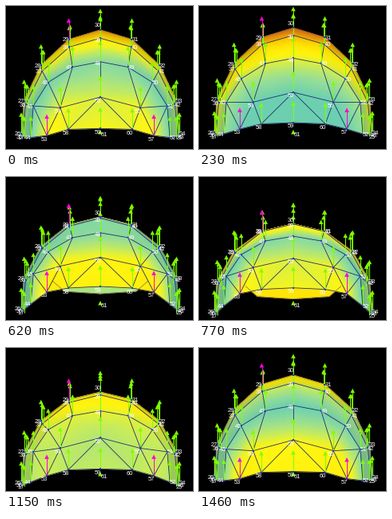
These frames come from a looping animation (234 by 179 pixels, 1540 ms). A matplotlib script:

```python
import numpy as np
import matplotlib.pyplot as plt
from matplotlib.animation import FuncAnimation
from matplotlib.collections import LineCollection, PolyCollection
from matplotlib.colors import LinearSegmentedColormap

W, H, DPI = 234, 179, 64
PX = 72 / DPI                      # one pixel in points
LOOP, TICK, POSES = 1540, 20, 20   # ms, ms, poses per loop
MID, ARROW = 118, 24
GREEN, PINK = "#7dff00", "#ff00d8"
NAVY, BROWN = "#202468", "#75604a"

LIMIT = 18
STOPS = [(0, "#6cd0b0"), (3, "#96de98"), (5.5, "#c8ec5c"), (7.5, "#fff612"),
         (10, "#ffec08"), (12, "#ffcc00"), (14.5, "#f89a10"), (18, "#d85a10")]
HEAT = LinearSegmentedColormap.from_list("heat", [(v / LIMIT, c) for v, c in STOPS])

place, swing, phase = {}, {}, {}


def arch(first, count, width, base, rise, bend, amp, delay):
    """Add an arched row of nodes; amp and delay run from foot to crown."""
    for i, t in enumerate(np.linspace(0, np.pi, count)):
        s, c = abs(np.sin(t)), np.cos(t)
        n = first + i
        place[n] = (MID - width * c * (1 + 0.12 * s * abs(c)), base - rise * s ** bend)
        swing[n] = amp[0] + (amp[1] - amp[0]) * s ** 2
        phase[n] = delay[0] + (delay[1] - delay[0]) * s


arch(17, 9, 95, 169, 117, 1.15, (6, 17), (2.5, 2))       # far row
arch(26, 9, 99, 164, 119.5, 1.15, (6, 18), (2.5, 2))     # skyline
arch(35, 9, 97, 167, 117.5, 1.15, (6, 13), (2.8, 2.5))
arch(44, 9, 87, 163, 91, 0.9, (5, 7), (6, 4))
arch(53, 5, 67, 154, 46, 0.9, (10, 7.5), (8, 8))
arch(58, 3, 40, 147.5, 1.5, 1, (8.5, 9), (8, 8))         # front sill
arch(70, 5, 60, 126, -16, 0.6, (13, 13), (2, 2))         # inner floor

ids = list(place)
index = {n: i for i, n in enumerate(ids)}
rest = np.array([place[n] for n in ids])
swing = np.array([swing[n] for n in ids])
phase = np.array([phase[n] for n in ids])
marked = [n for n in ids if n < 70]


def twin(n):
    """The node on the other side of the middle."""
    return 96 - n if n < 53 else 110 - n if n < 58 else 118 - n


# Faces run from the far side to the near side
floor = [(70, 71, 72, 73, 74)]
bands = [(r + i, r + i + 1, r + i + 10, r + i + 9) for r in (26, 35) for i in range(8)]
left = [(44, 45, 53), (45, 54, 53), (45, 46, 54), (46, 47, 54), (47, 48, 55, 54),
        (54, 55, 58), (53, 54, 58), (55, 59, 58)]
front = left + [tuple(twin(n) for n in face) for face in left]
faces = floor + bands + front

fan = [(f[0], f[k], f[k + 1]) for f in faces for k in range(1, len(f) - 1)]
fan = np.array([[index[n] for n in f] for f in fan])
edges = sorted({tuple(sorted(e)) for f in faces for e in zip(f, f[1:] + f[:1])}
               - {(70, 74)})
outline = [e for e in edges if e[0] >= 70 or e[1] < 35]
wires = [e for e in edges if e not in outline and e != (55, 59)]

side = [abs(f[0] % 9 - 3.5) / 3.5 for f in ((a - 26,) for a, *_ in bands)]
shades = [(0, 0, 0, 0.06 + 0.18 * s if f[0] < 35 else 0.15 * s ** 2)
          for f, s in zip(bands, side)]


def split(n):
    """Barycentric weights and small triangles that split one face n times."""
    spot = {}
    for i in range(n + 1):
        for j in range(n + 1 - i):
            spot[i, j] = len(spot)
    weights = np.array([(n - i - j, i, j) for i, j in spot]) / n
    small = []
    for i, j in spot:
        if i + j < n:
            small.append((spot[i, j], spot[i + 1, j], spot[i, j + 1]))
        if i + j < n - 1:
            small.append((spot[i + 1, j], spot[i + 1, j + 1], spot[i, j + 1]))
    return weights, np.array(small)


weights, small = split(4)
mesh = np.concatenate([small + k * len(weights) for k in range(len(fan))])

fig = plt.figure(figsize=(W / DPI, H / DPI), dpi=DPI, facecolor="black")
ax = fig.add_axes([0, 0, 1, 1])


def lines(segs, color, width, z):
    ax.add_collection(LineCollection(segs, colors=color, linewidths=width * PX, zorder=z),
                      autolim=False)


def polys(shapes, color, z):
    ax.add_collection(PolyCollection(shapes, facecolors=color, linewidths=0, zorder=z),
                      autolim=False)


def arrow_head(x, tip):
    return [(x - 2.8, tip + 3), (x + 2.8, tip + 3), (x, tip - 2.5)]


def number(n, x, y):
    ax.text(x, y, str(n), color="white", family="Liberation Sans",
            fontsize=7.5 * PX, ha="center", va="center", zorder=6)


def label(n, x, y):
    if n >= 53:
        number(n, x - 3, y + 5)
    elif abs(x - MID) < 2:
        number(n, x - 3, y - 5 if n == 30 else y + 3)
    else:
        number(n, x + 4 * np.sign(x - MID), y + 1)


def show(step):
    ax.clear()
    lift = swing * np.cos(2 * np.pi * (step - phase) / POSES)
    pos = np.column_stack([rest[:, 0], rest[:, 1] - lift])
    at = {n: pos[index[n]] for n in ids}

    x, y = np.concatenate([weights @ pos[f] for f in fan]).T
    heat = np.concatenate([weights @ np.abs(lift[f]) for f in fan])
    ax.tripcolor(x, y, heat, triangles=mesh, cmap=HEAT, vmin=0, vmax=LIMIT,
                 shading="gouraud", zorder=1)
    polys([[at[n] for n in f] for f in bands], shades, 2)

    skyline = [e for e in outline if e[0] < 70]
    if at[72][1] > at[59][1]:
        skyline = outline
    lines([(at[a], at[b]) for a, b in skyline], BROWN, 0.6, 3)
    lines([(at[a], at[b]) for a, b in wires], NAVY, 0.8, 3)

    for color, z in ((GREEN, 4), (PINK, 5)):
        group = [at[n] for n in marked if (n in (29, 53, 57)) == (color == PINK)]
        lines([((px, py), (px, py - ARROW + 2)) for px, py in group], color, 1, z)
        polys([arrow_head(px, py - ARROW) for px, py in group], color, z)
    dots = np.array([at[n] for n in marked if n >= 26])
    ax.plot(*dots.T, "s", ms=2 * PX, mew=0, color="#2838d0", zorder=5)

    for n in marked:
        if n >= 26 or n in (17, 25):
            label(n, *at[n])
    polys([arrow_head(MID, 157.5)], GREEN, 4)
    number(61, MID + 4.5, 161.5)

    ax.set_xlim(0, W)
    ax.set_ylim(H, 0)
    ax.axis("off")


shown = None


def reset():
    global shown
    shown = None
    return []


def draw(frame):
    """Each pose is held for several ticks."""
    global shown
    step = int((frame * TICK + 15) * POSES / LOOP)
    if step != shown:
        show(step)
        shown = step
    return []


anim = FuncAnimation(fig, draw, frames=LOOP // TICK, interval=TICK,
                     init_func=reset, repeat=True, repeat_delay=0, blit=False)
plt.show()
```
